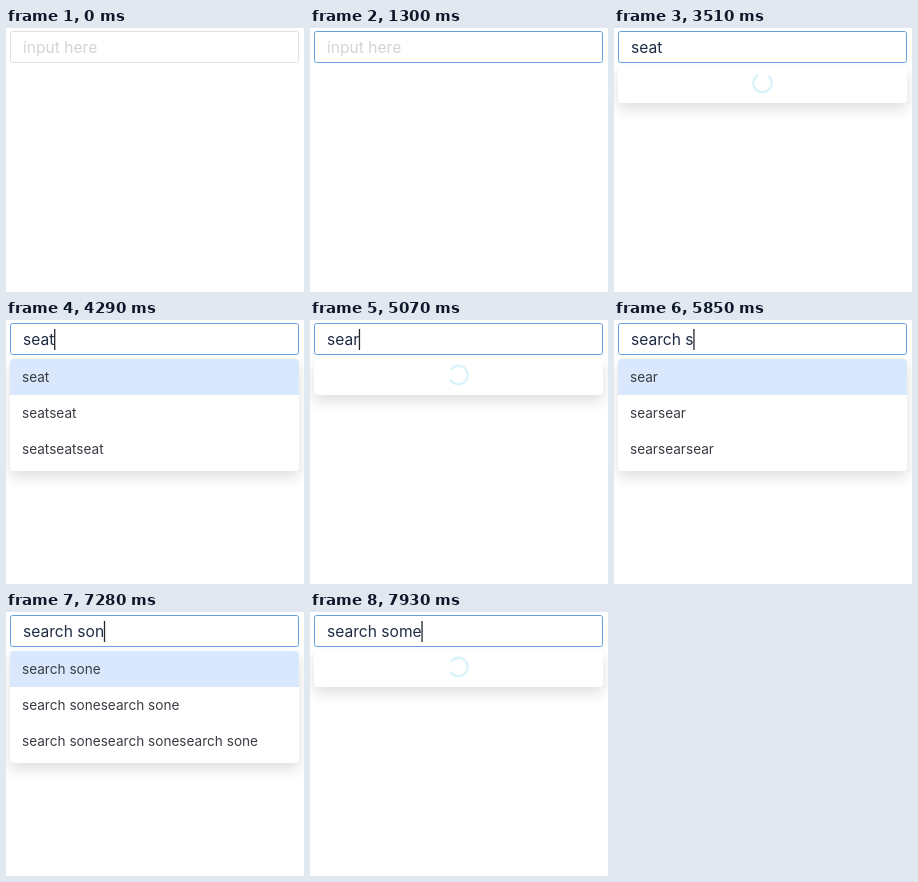
Write an HTML page that moves like this. It is 298 by 264 pixels and loops after 8000 ms.

```html
<!DOCTYPE html>
<html lang="en">
<head>
<meta charset="utf-8">
<title>Search field with suggestions</title>
<style>
  html, body { margin: 0; width: 100%; height: 100%; overflow: hidden; background: #fff; }
  svg { display: block; }
  text { font-family: Inter, "Open Sans", sans-serif; white-space: pre; }
  .field { font-size: 15.6px; }
  .item { font-size: 13.6px; fill: #383c42; }
  #panel { filter: drop-shadow(0 6px 7px rgba(0, 0, 0, .13)); }
</style>
</head>
<body>
<svg width="298" height="264" viewBox="0 0 298 264">
  <g id="menu">
    <rect id="panel" x="4" y="39" width="289" rx="4" fill="#fff"/>
    <circle id="spinner" cx="148.5" cy="55" r="9.3" fill="none" stroke="#d8f3fa"
      stroke-width="2.4" stroke-linecap="round" pathLength="360" stroke-dasharray="285 75"/>
    <g id="list">
      <path d="M4 75V43a4 4 0 0 1 4-4H289a4 4 0 0 1 4 4V75Z" fill="#d9e8fc"/>
      <text class="item" x="16" y="62"></text>
      <text class="item" x="16" y="98"></text>
      <text class="item" x="16" y="134"></text>
    </g>
  </g>
  <rect id="box" x="4.5" y="3.5" width="288" height="31" rx="2" fill="#fff"/>
  <text id="hint" class="field" x="17" y="25" fill="#d4d4d4">input here</text>
  <text id="typed" class="field" x="17" y="25" fill="#202c46"></text>
  <rect id="caret" y="9" width="1.3" height="21" fill="#25272c"/>
  <path id="pointer" d="M62.5 145.5V160.500L66 157.300L68.300 163L71 162L68.600 156.500H73.300Z"
    fill="#111" stroke="#fff"/>
</svg>
<script>
const LOOP = 8000, FOCUS = 780, FADE = 400, BLINK = 500, SPIN = 1000;

const typing = [
  [FOCUS, ""], [1820, "s"], [2080, "se"], [2860, "sea"], [2990, "seat"],
  [4550, "sea"], [4810, "sear"], [5200, "searc"], [5460, "search"],
  [5720, "search "], [5850, "search s"], [5980, "search so"],
  [6240, "search son"], [6370, "search sone"], [7280, "search son"],
  [7410, "search so"], [7540, "search som"], [7670, "search some"]
];

// An empty query means the suggestions are loading.
const results = [
  [2340, ""], [2990, "se"], [3250, ""], [3900, "seat"],
  [5070, ""], [5720, "sear"], [6630, ""], [7280, "search sone"], [7930, ""]
];

const $ = id => document.getElementById(id);
const show = (node, on) => node.setAttribute("display", on ? "inline" : "none");
const latest = (track, t) => track.findLast(([start]) => t >= start);
const mix = (a, b, k) => `rgb(${a.map((v, i) => Math.round(v + (b[i] - v) * k))})`;
const items = [...document.querySelectorAll(".item")];

function drawField(t) {
  const focus = Math.min(1, Math.max(0, (t - FOCUS) / FADE));
  const [since, value] = latest(typing, t) || [0, ""];
  $("box").setAttribute("stroke", mix([224, 224, 224], [103, 160, 218], 1 - (1 - focus) ** 2));
  $("typed").textContent = value;
  show($("hint"), !value);
  show($("caret"), t >= FOCUS && (t - since) % (2 * BLINK) < BLINK);
  $("caret").setAttribute("x", 16.7 + (value ? $("typed").getComputedTextLength() : 0));
}

function drawMenu(t) {
  const state = latest(results, t);
  show($("menu"), state);
  if (!state) return;
  const [since, query] = state;
  $("panel").setAttribute("height", query ? 112 : 36);
  show($("list"), query);
  show($("spinner"), !query);
  items.forEach((item, i) => item.textContent = query.repeat(i + 1));
  const angle = 217 + (t - since) / SPIN * 360;
  $("spinner").setAttribute("transform", `rotate(${angle} 148.5 55)`);
}

function draw(now) {
  const t = (now + 8) % LOOP;
  drawField(t);
  drawMenu(t);
  show($("pointer"), t >= 130 && t < 260);
  requestAnimationFrame(() => draw(performance.now()));
}

draw(performance.now());
</script>
</body>
</html>
```
